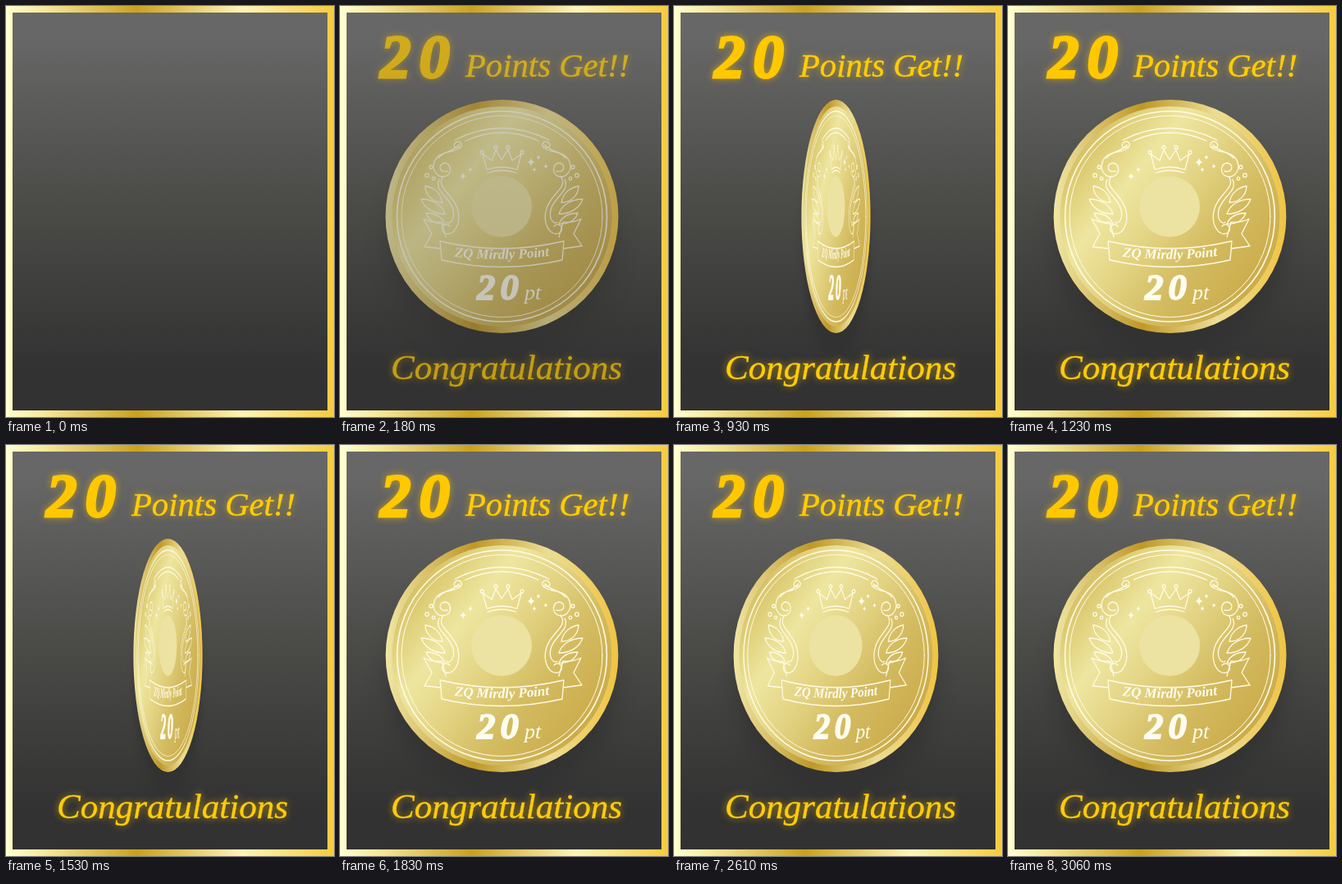
Recreate the animation shown at these times as an HTML page. Size 400 by 500 pixels, loop 4530 ms.

```html
<!DOCTYPE html>
<html lang="en">
<head>
<meta charset="utf-8">
<title>20 Points Get</title>
<style>
  html, body { margin: 0; width: 100%; height: 100%; overflow: hidden; background: #333; }
  svg { display: block; width: 100%; height: 100%; }
  text { font-family: "Liberation Serif", "Times New Roman", serif; font-style: italic; }
  .number { font-weight: bold; paint-order: stroke; }
  .headline { fill: #ffcc0a; filter: drop-shadow(0 0 4px #e8b400b0); }
  .headline text { stroke: #ffcc0a; stroke-width: .4; }
  .headline .number { fill: #ffc800; stroke: #ffc800; stroke-width: 3; }
  .shadow { fill: #303030; opacity: .75; filter: blur(14px); }
  .lines { fill: none; stroke: #fffbe6; stroke-width: 1.3; stroke-linecap: round; stroke-linejoin: round; }
  .engraved { fill: #fffdf0; }
</style>
</head>
<body>
<svg viewBox="0 0 400 500">
  <defs>
    <linearGradient id="backdrop" x2="0" y2="1">
      <stop offset=".06" stop-color="#676767"/>
      <stop offset=".48" stop-color="#4b4b48"/>
      <stop offset=".9" stop-color="#323232"/>
    </linearGradient>
    <linearGradient id="gold">
      <stop stop-color="#ffffd2"/>
      <stop offset=".12" stop-color="#f6e79a"/>
      <stop offset=".4" stop-color="#c9a11d"/>
      <stop offset=".72" stop-color="#fff4b8"/>
      <stop offset="1" stop-color="#f6cb3c"/>
    </linearGradient>
    <linearGradient id="rim">
      <stop stop-color="#f0e6a4"/>
      <stop offset=".12" stop-color="#e0cc7c"/>
      <stop offset=".38" stop-color="#bf9828"/>
      <stop offset=".7" stop-color="#ecdd94"/>
      <stop offset="1" stop-color="#efc443"/>
    </linearGradient>
    <linearGradient id="face" x2="1" y2=".8">
      <stop offset=".06" stop-color="#c8ae4e"/>
      <stop offset=".22" stop-color="#dfcf78"/>
      <stop offset=".36" stop-color="#eee6a0"/>
      <stop offset=".52" stop-color="#e4d585"/>
      <stop offset=".72" stop-color="#d3bb60"/>
      <stop offset=".95" stop-color="#cbab4a"/>
    </linearGradient>
    <path id="motto" d="M124 303 Q197 313 271 302"/>
    <path id="sparkle" d="M0-6 Q.6-.6 5 0 Q.6.6 0 6 Q-.6.6-5 0 Q-.6-.6 0-6"/>

    <!-- One side of the ornament, mirrored for the other -->
    <g id="flourish">
      <path d="M131 201 C121 203 119 193 127 191 C135 191 137 201 131 206 C121 212 111 201 115 190 C120 176 134 180 146 173 C151 169 146 162 141 166 C136 171 142 174 146 171"/>
      <path d="M120 185 C127 176 137 178 145 169"/>
      <path d="M126 207 C116 221 137 227 143 246 C149 265 138 282 127 276 C120 270 129 262 134 268"/>
      <path d="M121 211 C114 225 134 232 138 248 C141 262 132 266 130 263"/>
      <path d="M125 239 C113 239 104 230 104 219 C115 221 123 228 125 239 M128 253 C114 253 103 246 99 235 C112 235 124 241 128 253 M128 265 C117 266 108 261 105 252 C115 252 124 256 128 265"/>
      <circle cx="111" cy="196" r="2"/>
      <circle cx="106" cy="206" r="2.3"/>
      <circle cx="114" cy="210" r="1.8"/>
    </g>
  </defs>

  <rect width="400" height="500" fill="url(#gold)"/>
  <rect x="8" y="8" width="384" height="484" fill="url(#backdrop)"/>

  <g id="content" opacity="0">
    <g id="coin">
      <circle class="shadow" cx="197.5" cy="288" r="138"/>
      <circle cx="197.5" cy="256" r="142" fill="url(#rim)"/>
      <circle cx="197.5" cy="256" r="134" fill="url(#face)"/>
      <g class="lines">
        <circle cx="197.5" cy="256" r="128" stroke-width="1.6"/>
        <circle cx="197.5" cy="256" r="122.5" stroke-width="1"/>
        <path d="M140 163 Q197 134 255 163 M153 164 Q197 144 242 164"/>
        <use href="#flourish"/>
        <use href="#flourish" transform="matrix(-1 0 0 1 395 0)"/>
        <path d="M179 199 L174 180 L185 188 L190 175 L197 187 L205 175 L210 188 L221 180 L216 199 Q197 193 179 199 M180 203 Q197 197 215 203"/>
        <circle cx="173" cy="178" r="2"/>
        <circle cx="190" cy="172" r="2"/>
        <circle cx="205" cy="172" r="2"/>
        <circle cx="222" cy="178" r="2"/>
        <path d="M122 295 L103 293 L112 277 L102 259 Q112 264 124 263 L129 281 M273 295 L295 292 L285 277 L294 259 Q284 264 272 263 L267 281"/>
        <path d="M122 286 Q197 304 273 286 L271 309 Q197 326 124 309 Z"/>
      </g>
      <g class="engraved">
        <circle cx="197" cy="244" r="37" fill="#ece2a2"/>
        <use href="#sparkle" x="233" y="190"/>
        <use href="#sparkle" transform="translate(242 184) scale(.5)"/>
        <use href="#sparkle" transform="translate(237 199) scale(.5)"/>
        <use href="#sparkle" transform="translate(251 195) scale(.5)"/>
        <use href="#sparkle" transform="translate(150 207) scale(.8)"/>
        <use href="#sparkle" transform="translate(159 199) scale(.6)"/>
        <text font-size="17" font-weight="bold" text-anchor="middle"><textPath href="#motto" startOffset="50%">ZQ Mirdly Point</textPath></text>
        <text class="number" x="167" y="357" font-size="45" letter-spacing="6" stroke="#fffdf0" stroke-width="1.8">20</text>
        <text x="225" y="357" font-size="26">pt</text>
      </g>
    </g>
    <g class="headline">
      <text class="number" x="49" y="87" font-size="75" letter-spacing="10">20</text>
      <text x="153" y="86" font-size="40.7">Points Get!!</text>
      <text x="62" y="454" font-size="43">Congratulations</text>
    </g>
  </g>
</svg>
<script>
  const LOOP = 4530, STEP = 30;
  const FADE_END = 540;
  const SPIN_START = 660, SPIN_END = 3060, SPIN_PERIOD = 600;
  const CENTER_X = 197.5, EDGE_WIDTH = 0.035;

  const content = document.getElementById("content");
  const coin = document.getElementById("coin");

  const fade = t => 1 - (1 - Math.min(t / FADE_END, 1)) ** 3;

  // The coin narrows to its edge with a cubic ease, then opens again.
  function coinWidth(t) {
    if (t < SPIN_START || t >= SPIN_END) return 1;
    const phase = (t - SPIN_START) % SPIN_PERIOD / SPIN_PERIOD;
    const closing = 1 - Math.abs(2 * phase - 1);
    return 1 - (1 - EDGE_WIDTH) * closing ** 3;
  }

  const start = performance.now();

  function draw() {
    const elapsed = (performance.now() - start) % LOOP;
    const t = Math.floor(elapsed / STEP) * STEP;
    const width = coinWidth(t);
    content.setAttribute("opacity", fade(t));
    coin.setAttribute("transform", `matrix(${width} 0 0 1 ${CENTER_X * (1 - width)} 0)`);
    requestAnimationFrame(draw);
  }
  draw();
</script>
</body>
</html>
```
